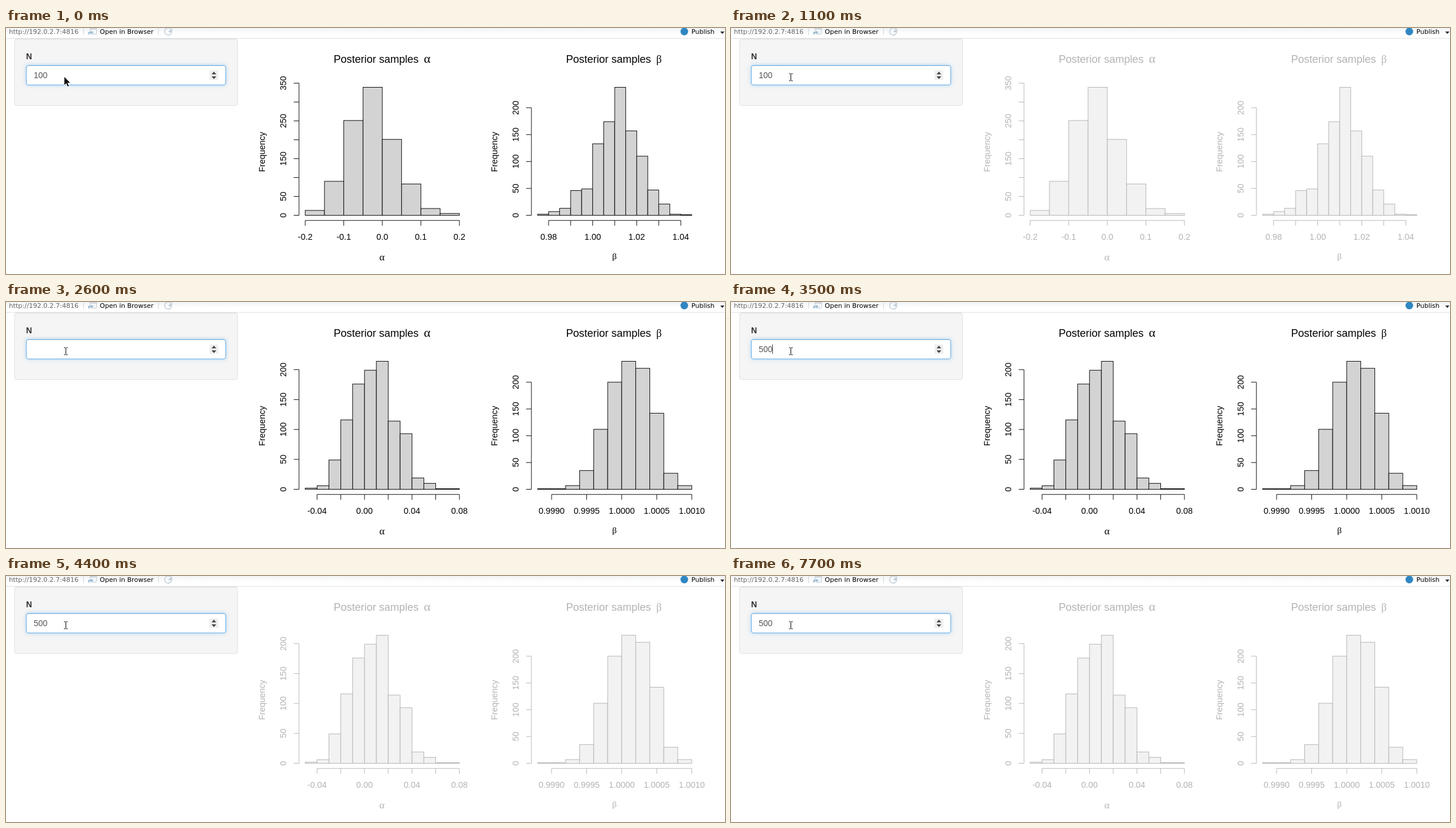
An HTML page for the animation above (8 s loop, 1219 by 417 pixels).

```html
<!DOCTYPE html>
<html lang="en">
<head>
<meta charset="utf-8">
<title>Posterior samples</title>
<style>
html, body { margin: 0; width: 1219px; height: 417px; overflow: hidden; background: #fff; }
div, svg { position: absolute; box-sizing: border-box; }
svg { left: 0; top: 0; }
.toolbar { left: 0; top: 0; width: 1219px; height: 18px; border-bottom: 1px solid #dde0e3;
  background: linear-gradient(#f1f3f5, #fff 10px); }
.panel { left: 14px; top: 18px; width: 379px; height: 114px; background: #f5f5f5;
  border: 1px solid #e3e3e3; border-radius: 4px; box-shadow: inset 0 1px 1px rgba(0,0,0,.05); }
.field { left: 34px; top: 63px; width: 339px; height: 34px; background: #fff;
  border: 1px solid #66afe9; border-radius: 4px;
  box-shadow: inset 0 1px 1px rgba(0,0,0,.075), 0 0 6px rgba(102,175,233,.5); }
.bar { font: 11px "DejaVu Sans", sans-serif; }
.form { font: 14px "Liberation Sans", Arial, sans-serif; }
.plot { font: 14.4px "Liberation Sans", Arial, sans-serif; }
.plot rect { fill: #d3d3d3; stroke: #000; stroke-width: .94; }
.plot path { fill: none; stroke: #000; stroke-width: .94; }
.greek { font-family: "Liberation Serif", serif; }
.mid { text-anchor: middle; }
</style>
</head>
<body>
<div class="toolbar"></div>
<div class="panel"></div>
<div class="field"></div>
<svg width="1219" height="417" viewBox="0 0 1219 417">
  <g class="bar">
    <path d="M131.5 0V12M258.5 0V12" stroke="#d4d8db"/>
    <text x="5" y="10" fill="#666">http://192.0.2.7:4816</text>
    <rect x="142.500" y="-1.500" width="11" height="12" rx="1" fill="#f4f7f9" stroke="#c3cdd4"/>
    <path d="M142 1.500h12" stroke="#c3cdd4" stroke-width="2"/>
    <path d="M139 11v-3q0-2 2-2h3v-2l5 3.500-5 3.500v-2h-2v2z" fill="#9dbdd4" stroke="#fff" stroke-width=".5"/>
    <text x="159" y="10">Open in Browser</text>
    <path d="M279 1.500A6 6 0 1 0 281 6.500H275.500" fill="none" stroke="#c3d0da" stroke-width="1.600"/>
    <path d="M281.500 0v6h-6z" fill="#c3d0da"/>
    <circle cx="1150" cy="6" r="6.500" fill="#2f86c1"/>
    <text x="1162" y="10">Publish</text>
    <path d="M1211 6h7l-3.500 4z" fill="#222"/>
  </g>
  <g class="form">
    <text x="34" y="53" font-weight="bold" fill="#333">N</text>
    <text id="value" x="47" y="85" fill="#555"></text>
    <rect id="caret" y="72" width="1" height="16" fill="#444"/>
    <rect x="345" y="72" width="15" height="16" fill="#efefef"/>
    <path d="M348.500 78.500l4-4.500 4 4.500zM348.500 82l4 4.500 4-4.500z" fill="#444"/>
  </g>
  <g id="before" class="plot"></g>
  <g id="after" class="plot"></g>
  <path id="arrow" d="M98.500 82v15.500l3.500-3.300 2.600 5.600 2.600-1.200-2.500-5.400h4.800z" fill="#000" stroke="#fff"/>
  <g id="beam" fill="none">
    <path d="M98.500 77.500h2l1 1 1-1h2M101.500 78v11M98.500 89.500h2l1-1 1 1h2" stroke="#fff" stroke-width="3"/>
    <path d="M98.500 77.500h2l1 1 1-1h2M101.500 78v11M98.500 89.500h2l1-1 1 1h2" stroke="#000"/>
  </g>
</svg>
<script>
const $ = id => document.getElementById(id);

// One plot is 394 wide; a margin line is 18, and the data leave 4% free on each side.
const PANEL = 394, LEFT = 507.26, WIDTH = 261.48, BASE = 317.5, HEIGHT = 217;
const AXIS_X = 496.8, AXIS_Y = 326.2, TICK = 9;

const label = (s, x, y, attrs = 'class="mid"') => `<text x="${x}" y="${y}" ${attrs}>${s}</text>`;
const upright = (s, x, y) => label(s, 0, 0, `class="mid" transform="translate(${x} ${y}) rotate(-90)"`);

// counts fill bins of width `bin` from `from`; ticks = [first, step, number, label every, decimals]
function histogram({ greek, shift, from, bin, counts, ticks, yTop, sparse }) {
  const scale = HEIGHT / Math.max(...counts), w = WIDTH / counts.length;
  const py = v => BASE - v * scale;
  const px = v => LEFT + (v - from) / bin * w;
  let out = '', d = '';

  counts.forEach((n, i) => {
    out += `<rect x="${LEFT + i * w}" y="${py(n)}" width="${w}" height="${n * scale}"/>`;
  });

  d += `M${AXIS_X} ${BASE}V${py(yTop)}`;
  for (let v = 0; v <= yTop; v += 50) {
    d += `M${AXIS_X} ${py(v)}h${-TICK}`;
    if (!sparse || !v || v % 100) out += upright(v, 475, py(v));
  }

  const [first, step, number, every, decimals] = ticks;
  d += `M${px(first)} ${AXIS_Y}H${px(first + step * (number - 1))}`;
  for (let i = 0; i < number; i++) {
    const v = first + step * i;
    d += `M${px(v)} ${AXIS_Y}v${TICK}`;
    if (i % every == 0) out += label((Math.abs(v) < 1e-9 ? 0 : v).toFixed(decimals), px(v), 359);
  }

  const alpha = greek == 'α';
  out += upright('Frequency', 439, 210)
    + label('Posterior samples', 555.5, 59, 'font-size="18"')
    + label(greek, 708.5, 59, `class="greek" font-size="${alpha ? 21 : 18}"`)
    + label(greek, 637.5, alpha ? 394 : 392, `class="greek mid" font-size="${alpha ? 17 : 15}"`);
  return `<g transform="translate(${shift})">${out}<path d="${d}"/></g>`;
}

$('before').innerHTML = histogram({
  greek: 'α', shift: 0, from: -.2, bin: .05, ticks: [-.2, .1, 5, 1, 1], yTop: 350, sparse: true,
  counts: [13, 90, 251, 339, 201, 83, 18, 5]
}) + histogram({
  greek: 'β', shift: PANEL, from: .975, bin: .005, ticks: [.98, .01, 7, 2, 2], yTop: 200,
  counts: [2, 7, 13, 46, 49, 133, 174, 238, 157, 110, 47, 21, 2, 1]
});
$('after').innerHTML = histogram({
  greek: 'α', shift: 0, from: -.05, bin: .01, ticks: [-.04, .02, 7, 2, 2], yTop: 200,
  counts: [2, 6, 49, 116, 176, 199, 214, 114, 93, 19, 10, 1, 1]
}) + histogram({
  greek: 'β', shift: PANEL, from: .9988, bin: .0002, ticks: [.999, .0005, 5, 1, 4], yTop: 200,
  counts: [1, 1, 7, 35, 112, 200, 239, 226, 142, 30, 7]
});

// latest value whose start time has passed
const at = (t, steps) => steps.filter(s => s[0] <= t).pop()[1];
const typing = [[0, '100'], [2300, '10'], [2500, '1'], [2600, ''], [2900, '5'], [3200, '50'], [3500, '500']];
const fade = [[0, 1], [100, .93], [200, .42], [300, .3], [1300, 1], [4300, .93], [4400, .3]];
const blinks = [500, 1100, 1700, 2300, 2900, 4100, 4600, 5300, 5900, 6500, 7100, 7700];
const show = (id, on) => $(id).setAttribute('visibility', on ? 'visible' : 'hidden');

const start = performance.now();
function draw(now) {
  const t = Math.max(0, now - start) % 8000;
  const text = at(t, typing), opacity = at(t, fade);
  $('value').textContent = text;
  $('caret').setAttribute('x', Math.floor(47.3 + text.length * 7.79));
  show('caret', blinks.filter(b => b <= t).length % 2);
  show('before', t < 1300);
  show('after', t >= 1300);
  $('before').style.opacity = $('after').style.opacity = opacity;
  show('arrow', t < 100);
  show('beam', t >= 100);
  requestAnimationFrame(draw);
}
draw(start);
</script>
</body>
</html>
```
